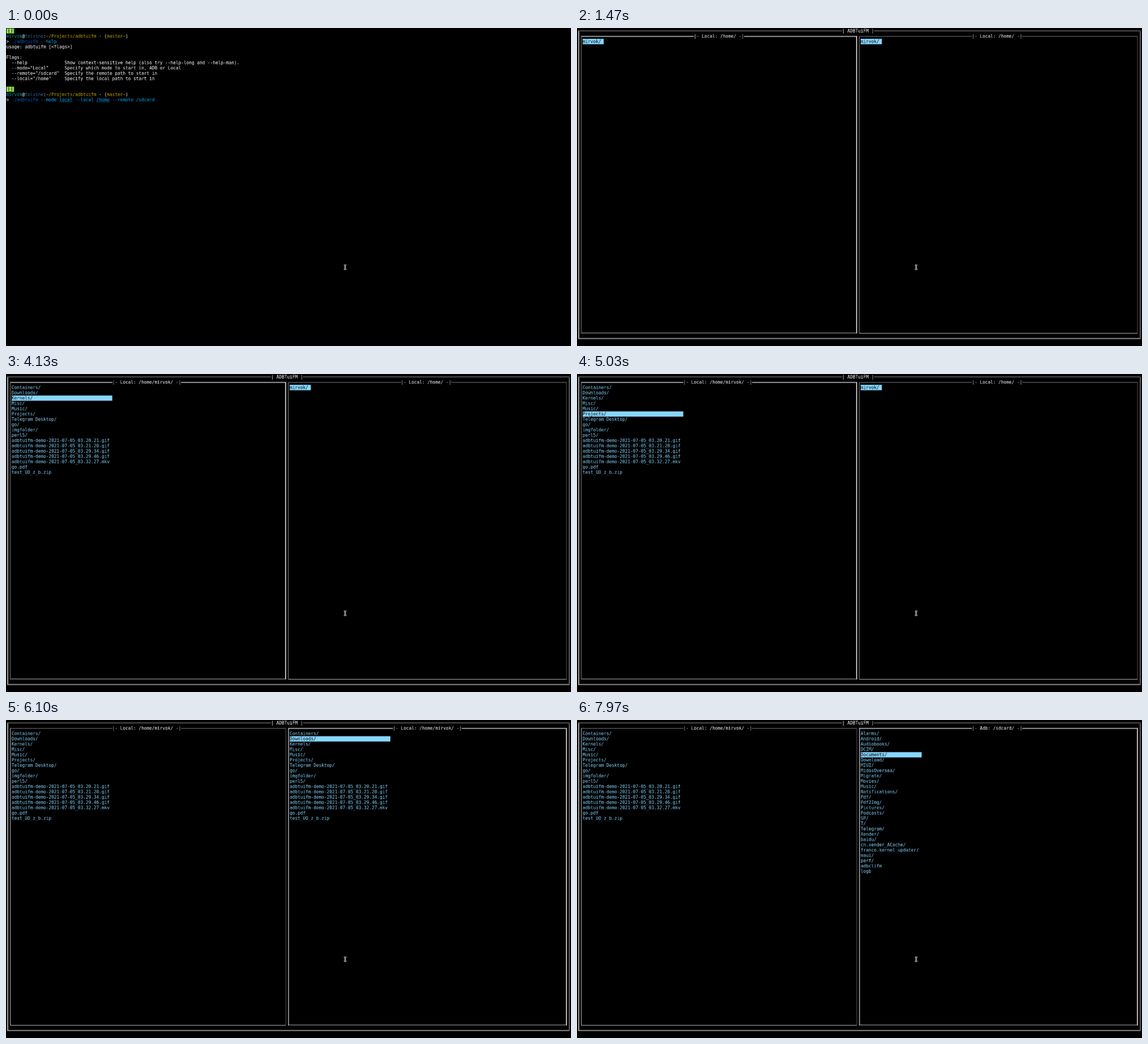
An HTML page with a canvas for the animation above (8000 ms loop, 998 by 561 pixels).

```html
<!DOCTYPE html>
<html lang="en">
<head>
<meta charset="utf-8">
<title>Terminal file manager</title>
<style>
  html, body { margin: 0; width: 100%; height: 100%; overflow: hidden; background: #000; }
  canvas { display: block; }
</style>
</head>
<body>
<canvas id="stage" width="998" height="561"></canvas>
<script>
const LOOP = 8000;
const CW = 9, CH = 18, PAD = 1; // terminal cell and padding on a 1920x1080 screen
const WHITE = '#ffffff', SKY = '#87d7ff', TEAL = '#06989a', BLUE = '#3465a4',
      GOLD = '#c4a000', GREEN = '#4e9a06', COMMAND = '#005fd7', PARAM = '#00afff';
const USER = 'mirvok', HOST = 'tolvine';

const stage = document.getElementById('stage').getContext('2d');
const screen = document.createElement('canvas');
screen.width = 1920;
screen.height = 1080;
const ctx = screen.getContext('2d');

const DEMOS = ['20.21.gif', '21.28.gif', '29.34.gif', '29.46.gif', '32.27.mkv']
  .map(end => 'adbtuifm-demo-2021-07-05_03.' + end);
const ROOT = [USER + '/'];
const HOME = ['Containers/', 'Downloads/', 'Kernels/', 'Misc/', 'Music/', 'Projects/',
  'Telegram Desktop/', 'go/', 'imgfolder/', 'perl5/', ...DEMOS, 'go.pdf', 'test_UO_z_b.zip'];
const SDCARD = ['Alarms/', 'Android/', 'Audiobooks/', 'DCIM/', 'Documents/', 'Download/', 'MIUI/',
  'MidasOversea/', 'Migrate/', 'Movies/', 'Music/', 'Notifications/', 'Pdf/', 'Pdf2Img/',
  'Pictures/', 'Podcasts/', 'SP/', 'T/', 'Telegram/', 'Xender/', 'baidu/', 'cn.xender_ACache/',
  'franco.kernel_updater/', 'maui/', 'perf/', 'adbclifm', 'logb'];

const rootView = { title: 'Local: /home/', files: ROOT };
const homeView = { title: `Local: /home/${USER}/`, files: HOME };
const cardView = { title: 'Adb: /sdcard/', files: SDCARD };

// Key presses, in ms
const LAUNCH = 1100, OPEN_LEFT = 3200, SWITCH = 5300, OPEN_RIGHT = 5600, TO_CARD = 7250;

const cellX = col => PAD + col * CW;
const cellY = row => PAD + row * CH;

function fillCells(col, row, count, color) {
  ctx.fillStyle = color;
  ctx.fillRect(cellX(col), cellY(row), count * CW, CH);
}

function text(col, row, str, color, bold = false) {
  ctx.font = (bold ? 'bold ' : '') + '15px "DejaVu Sans Mono", monospace';
  ctx.fillStyle = color;
  [...str].forEach((ch, i) => {
    if (ch !== ' ') ctx.fillText(ch, cellX(col + i), cellY(row) + 14);
  });
}

function spans(row, parts) {
  let col = 0;
  for (const [str, color, underline] of parts) {
    text(col, row, str, color);
    if (underline) ctx.fillRect(cellX(col), cellY(row) + 15, str.length * CW, 1);
    col += str.length;
  }
}

function box(left, top, right, bottom, title, double) {
  const x = cellX(left) + 4.5, y = cellY(top) + 9.5;
  const w = (right - left) * CW, h = (bottom - top) * CH;
  ctx.strokeStyle = WHITE;
  ctx.lineWidth = 1;
  for (const d of double ? [-1, 1] : [0]) ctx.strokeRect(x - d, y - d, w + 2 * d, h + 2 * d);
  const col = left + Math.floor((right - left + 1 - title.length) / 2);
  fillCells(col, top, title.length, '#000');
  text(col, top, title, WHITE);
}

function panel(left, right, view, selected, focused) {
  box(left, 1, right, 57, `|- ${view.title} -|`, focused);
  const width = Math.max(...view.files.map(name => name.length)) + 1;
  view.files.forEach((name, i) => {
    const on = i === selected;
    if (on) fillCells(left + 1, i + 2, width, SKY);
    text(left + 1, i + 2, name, on ? '#000' : SKY);
  });
}

function prompt(row, args) {
  fillCells(0, row, 3, GREEN);
  text(0, row, '[I]', WHITE, true);
  spans(row + 1, [[USER, TEAL], ['@', WHITE], [HOST, BLUE], [':', WHITE],
    ['~/Projects/adbtuifm', GOLD], [' · (', WHITE], ['master~', GOLD], [')', WHITE]]);
  spans(row + 2, [['> ', WHITE], ['./adbtuifm', COMMAND], ...args]);
}

function shell() {
  prompt(0, [[' --help', PARAM]]);
  [
    'usage: adbtuifm [<flags>]',
    '',
    'Flags:',
    '  --help              Show context-sensitive help (also try --help-long and --help-man).',
    '  --mode="Local"      Specify which mode to start in, ADB or Local',
    '  --remote="/sdcard"  Specify the remote path to start in',
    '  --local="/home"     Specify the local path to start in'
  ].forEach((line, i) => text(0, i + 3, line, WHITE));
  prompt(11, [[' --mode ', PARAM], ['local', PARAM, true], [' --local ', PARAM],
    ['/home', PARAM, true], [' --remote /sdcard', PARAM]]);
}

// Selected row after repeated presses of the down key
function steps(t, first, gap, last) {
  return Math.max(0, Math.min(last, Math.floor((t - first) / gap) + 1));
}

function manager(t) {
  const onRight = t >= SWITCH;
  box(0, 0, 212, 58, '| ADBTuiFM |', true);

  const left = t < OPEN_LEFT ? rootView : homeView;
  const leftRow = onRight ? -1 : steps(t, 3700, 250, 5);
  panel(1, 105, left, t < OPEN_LEFT ? 0 : leftRow, !onRight);

  if (t < OPEN_RIGHT) panel(106, 211, rootView, 0, onRight);
  else if (t < TO_CARD) panel(106, 211, homeView, steps(t, 6000, 180, 6), true);
  else panel(106, 211, cardView, steps(t, 7430, 135, 4), true);
}

function pointer() {
  const x = 1152.5, y = 812.5;
  for (const [color, width, grow] of [[WHITE, 4, 1], ['#000', 1.4, 0]]) {
    ctx.strokeStyle = color;
    ctx.lineWidth = width;
    ctx.beginPath();
    for (const dy of [-7, 7]) {
      ctx.moveTo(x - 3 - grow, y + dy);
      ctx.lineTo(x + 3 + grow, y + dy);
    }
    ctx.moveTo(x, y - 7);
    ctx.lineTo(x, y + 7);
    ctx.stroke();
  }
}

function draw(t) {
  ctx.fillStyle = '#000';
  ctx.fillRect(0, 0, 1920, 1080);
  if (t < LAUNCH) shell();
  else manager(t);
  pointer();
  stage.imageSmoothingEnabled = true;
  stage.imageSmoothingQuality = 'high';
  stage.drawImage(screen, 0, 0, 998, 561);
}

const start = performance.now();
function tick() {
  draw((performance.now() - start) % LOOP);
  requestAnimationFrame(tick);
}
tick();
</script>
</body>
</html>
```
